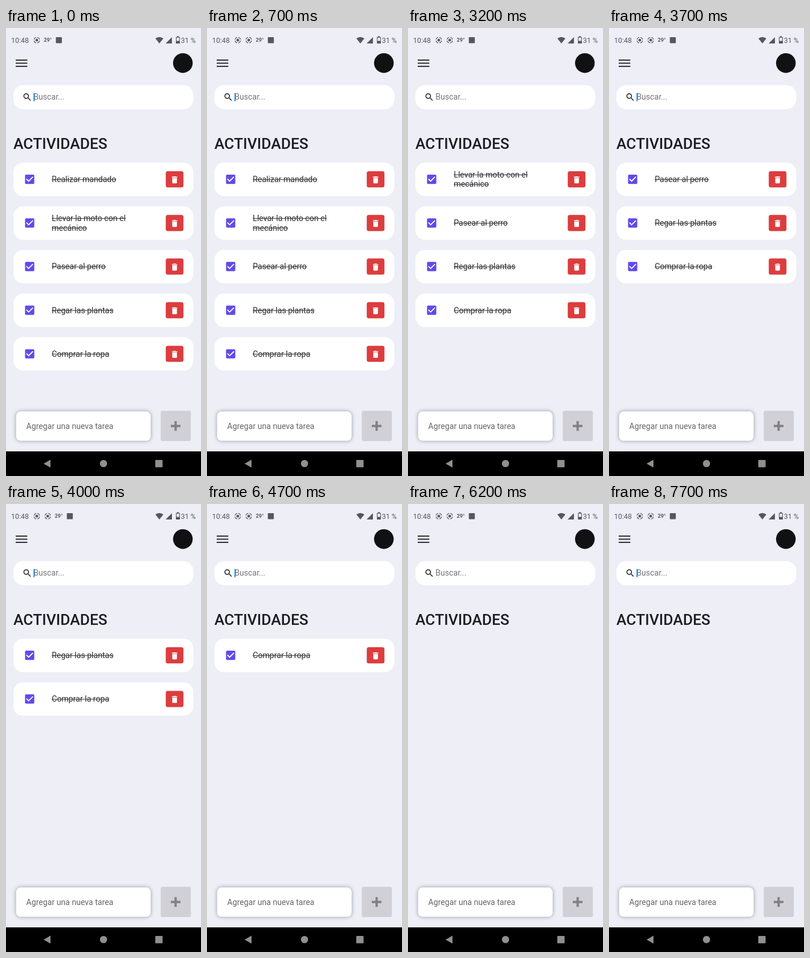
Animation of 342 by 782 pixels, one loop 8000 ms. Source, as an HTML page with a canvas:

```html
<!DOCTYPE html>
<html lang="es">
<head>
<meta charset="utf-8">
<title>Actividades</title>
<style>
html, body { margin: 0; width: 100%; height: 100%; overflow: hidden; background: #edeef6; }
canvas { display: block; width: 342px; height: 782px; }
</style>
</head>
<body>
<canvas id="stage"></canvas>
<script>
const W = 342, H = 782, LOOP = 8000;
const canvas = document.getElementById('stage');
const ctx = canvas.getContext('2d');
const dpr = window.devicePixelRatio || 1;
canvas.width = W * dpr;
canvas.height = H * dpr;

const BG = '#edeef6', INK = '#1d1c22', STATUS = '#56575c';
const TASKS = [
  ['Realizar mandado'],
  ['Llevar la moto con el', 'mecánico'],
  ['Pasear al perro'],
  ['Regar las plantas'],
  ['Comprar la ropa']
];
const REMOVALS = [2600, 3300, 3900, 4400, 5200];
const ROW_TOP = 235, ROW_H = 58.5, ROW_STEP = 76.15;

const ICONS = {
  search: new Path2D('M9.5 3A6.5 6.5 0 0 1 16 9.5C16 11.11 15.41 12.59 14.44 13.73L14.71 14H15.5L20.5 19L19 20.5L14 15.5V14.71L13.73 14.44C12.59 15.41 11.11 16 9.5 16A6.5 6.5 0 0 1 9.5 3M9.5 5C7 5 5 7 5 9.5S7 14 9.5 14S14 12 14 9.5S12 5 9.5 5Z'),
  trash: new Path2D('M19 4H15.5L14.5 3H9.5L8.5 4H5V6H19ZM6 19A2 2 0 0 0 8 21H16A2 2 0 0 0 18 19V7H6Z'),
  check: new Path2D('M10 17L5 12L6.41 10.58L10 14.17L17.59 6.58L19 8Z')
};

function box(x, y, w, h, r, color) {
  ctx.fillStyle = color;
  ctx.beginPath();
  ctx.roundRect(x, y, w, h, r);
  ctx.fill();
}

function disc(x, y, r, color) {
  ctx.fillStyle = color;
  ctx.beginPath();
  ctx.arc(x, y, r, 0, Math.PI * 2);
  ctx.fill();
}

function poly(color, ...pts) {
  ctx.fillStyle = color;
  ctx.beginPath();
  pts.forEach(([x, y]) => ctx.lineTo(x, y));
  ctx.fill();
}

function icon(path, x, y, scale, color) {
  ctx.save();
  ctx.translate(x, y);
  ctx.scale(scale, scale);
  ctx.translate(-12, -12);
  ctx.fillStyle = color;
  ctx.fill(path, 'evenodd');
  ctx.restore();
}

function label(str, x, y, size, color, weight = 400) {
  ctx.font = `${weight} ${size}px Roboto, sans-serif`;
  ctx.fillStyle = color;
  ctx.fillText(str, x, y);
}

// Notification ring with gaps at the four axes
function target(x, y, scale) {
  ctx.save();
  ctx.translate(x, y);
  ctx.scale(scale, scale);
  ctx.strokeStyle = STATUS;
  ctx.lineWidth = 1.1;
  for (let i = 0; i < 4; i++) {
    const a = i * Math.PI / 2;
    ctx.beginPath();
    ctx.arc(0, 0, 5, a + 0.2, a + 1.37);
    ctx.stroke();
  }
  disc(0, 0, 2.4, STATUS);
  ctx.restore();
}

function statusBar(t) {
  const p = Math.min(1, Math.max(0, (t - 100) / 400));
  const ease = 1 - (1 - p) ** 3;
  const dx = 19.2 * ease;
  label('10:48', 9, 26, 12.4, STATUS);
  if (ease > 0) target(54, 21.2, ease);
  target(54 + dx, 21.2, 1);
  label('29°', 66.3 + dx, 24.3, 9.1, STATUS, 700);
  box(87.5 + dx, 16, 10.5, 10.5, 1, STATUS);

  ctx.fillStyle = STATUS;
  ctx.beginPath();
  ctx.moveTo(269, 27);
  ctx.lineTo(262, 18.3);
  ctx.quadraticCurveTo(269, 13.2, 276, 18.3);
  ctx.fill();
  poly(STATUS, [280, 27], [291, 27], [291, 16]);

  box(300, 14.3, 3, 2, 0, STATUS);
  ctx.strokeStyle = STATUS;
  ctx.lineWidth = 1.1;
  ctx.strokeRect(298.6, 16.2, 5.8, 10.3);
  box(299, 22.5, 5, 4, 0, STATUS);
  label('31 %', 306.8, 26, 12.4, STATUS);
}

function header(cursorOn) {
  for (const y of [55, 60.4, 65.9]) box(17, y, 20.4, 2.1, 0, '#333338');
  disc(310.2, 61.2, 17.2, '#111113');

  box(13, 99.7, 315.5, 42, 17, '#fff');
  icon(ICONS.search, 37.3, 120.7, 0.75, INK);
  label('Buscar...', 48.3, 125.4, 14.1, '#747479');
  if (cursorOn) box(48.2, 113.5, 1.9, 14.5, 0, '#2a8de8');

  label('ACTIVIDADES', 13, 211, 26.4, INK, 500);
}

function row(lines, y) {
  const mid = y + ROW_H / 2;
  box(13, y, 315.5, ROW_H, 17, '#fff');
  box(33.4, mid - 8.2, 16.2, 16.2, 1.8, '#5f4bea');
  icon(ICONS.check, 41.5, mid - 0.1, 0.9, '#fff');
  lines.forEach((str, i) => {
    const base = mid + 4.8 + (i - (lines.length - 1) / 2) * 16.8;
    label(str, 80.3, base, 14.1, '#2c2b31');
    ctx.fillRect(80.3, base - 4.9, ctx.measureText(str).width, 1);
  });
  box(280.2, mid - 14.2, 31, 28.2, 3.5, '#dc3d3e');
  icon(ICONS.trash, 295.7, mid + 0.8, 0.68, '#fff');
}

function footer() {
  ctx.save();
  ctx.shadowColor = 'rgba(0, 0, 0, 0.36)';
  ctx.shadowBlur = 7 * dpr;
  box(17.7, 669.3, 236, 51.2, 8, '#fff');
  ctx.restore();
  label('Agregar una nueva tarea', 35.6, 699.8, 14.1, '#66666b');

  box(271.4, 668.2, 52.8, 52.8, 3, '#d0d0d6');
  box(289, 692.7, 17, 4, 0, '#808085');
  box(295.5, 686.2, 4, 17, 0, '#808085');

  const grey = '#909090';
  box(0, 739, W, H - 739, 0, '#000');
  poly(grey, [66, 760.4], [78, 753.6], [78, 767.2]);
  disc(171, 760.3, 6.3, grey);
  box(261.8, 754, 12.8, 12.8, 1, grey);
}

function draw(t) {
  ctx.setTransform(dpr, 0, 0, dpr, 0, 0);
  ctx.fillStyle = BG;
  ctx.fillRect(0, 0, W, H);
  statusBar(t);
  header(Math.floor((t + 300) / 500) % 2 === 0);
  const gone = REMOVALS.filter(at => t >= at).length;
  TASKS.slice(gone).forEach((lines, i) => row(lines, ROW_TOP + i * ROW_STEP));
  footer();
}

const start = performance.now();
function tick() {
  draw((performance.now() - start) % LOOP);
  requestAnimationFrame(tick);
}
tick();
</script>
</body>
</html>
```
